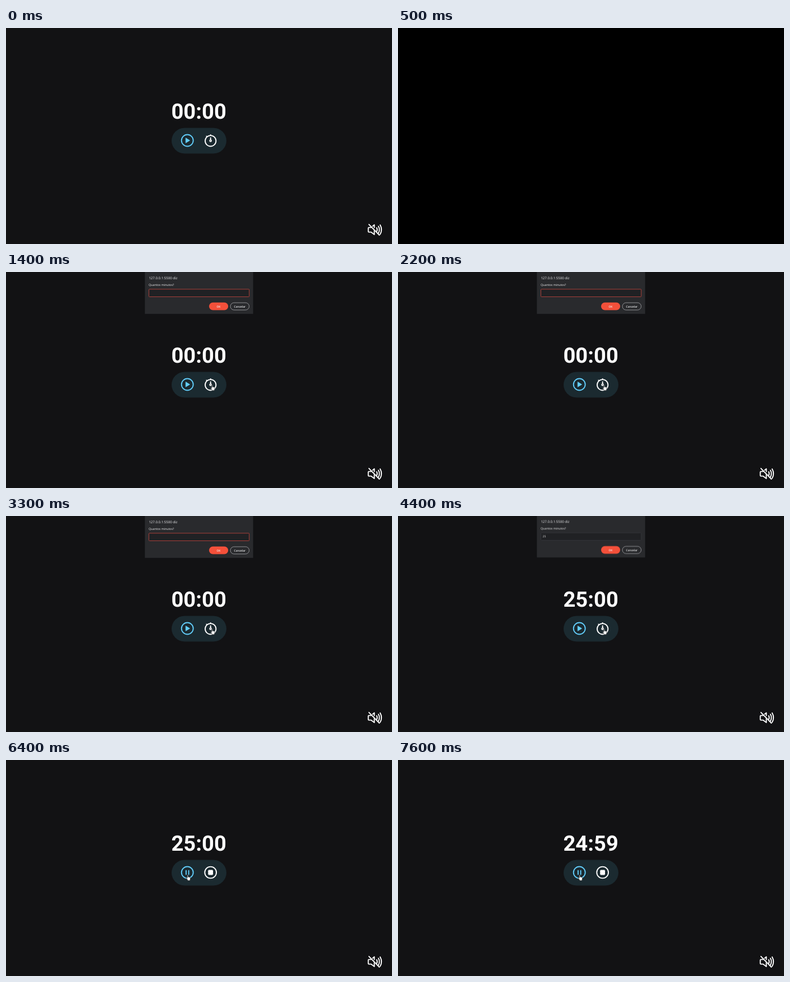
Write an HTML page that moves like this. It is 690 px wide and 388 px high and loops after 8000 ms.

```html
<!DOCTYPE html>
<html lang="pt">
<head>
<meta charset="utf-8">
<title>Focus timer</title>
<style>
  html, body { margin: 0; width: 100%; height: 100%; overflow: hidden; background: #121214; }
  svg { display: block; width: 690px; height: 388px; }
  text { text-rendering: geometricPrecision; fill: #f1f1f3; font-family: "Open Sans", "Noto Sans", sans-serif; }
  .clock text { font: 700 38.2px Roboto, Arial, sans-serif; fill: #fff; text-anchor: middle; }
  .line { fill: none; stroke: currentColor; stroke-width: 1.9; stroke-linecap: round; stroke-linejoin: round; }
  .blue { color: #62cdfa; }
  .white { color: #fff; }
  .btn { font-size: 4.9px; font-weight: 600; text-anchor: middle; }

  /* every part shares one 8 s clock with hard steps */
  .t { animation: 8s step-end infinite; }
  .zero { animation-name: zero; }
  .set { animation-name: set; }
  .run { animation-name: run; }
  .idle { animation-name: idle; }
  .active { animation-name: active; }
  .dialog { animation-name: dialog; }
  .field { animation-name: field; }
  .caret { animation-name: caret; }
  .key1 { animation-name: key1; }
  .key2 { animation-name: key2; }
  .hand { animation-name: hand; }
  .cut { animation-name: cut; }

  @keyframes zero { 0% { opacity: 1 } 55%, 100% { opacity: 0 } }
  @keyframes set { 0% { opacity: 0 } 55% { opacity: 1 } 92.5%, 100% { opacity: 0 } }
  @keyframes run { 0% { opacity: 0 } 92.5%, 100% { opacity: 1 } }
  @keyframes idle { 0% { opacity: 1 } 80%, 100% { opacity: 0 } }
  @keyframes active { 0% { opacity: 0 } 80%, 100% { opacity: 1 } }
  @keyframes cut { 0% { opacity: 0 } 6.25% { opacity: 1 } 8.75%, 100% { opacity: 0 } }
  @keyframes dialog {
    0% { opacity: 0; transform: translateY(-1.3px) }
    8.75% { opacity: 1; transform: translateY(-1.3px) }
    10% { opacity: 1; transform: none }
    55% { opacity: 1; transform: translateY(-.7px) }
    56.25% { opacity: .45; transform: translateY(-2px) }
    57.5%, 100% { opacity: 0; transform: translateY(-2px) }
  }
  @keyframes field { 0% { stroke: #a8403a } 55%, 100% { stroke: #35363a } }
  @keyframes caret {
    0%, 8.75% { opacity: 1; transform: none }
    13.75% { opacity: 0; transform: none }
    21.25% { opacity: 1; transform: none }
    27.5% { opacity: 0; transform: none }
    33.75% { opacity: 1; transform: none }
    41.25% { opacity: 0; transform: none }
    45% { opacity: 1; transform: translateX(3px) }
    48.75% { opacity: 1; transform: translateX(5.8px) }
    55%, 100% { opacity: 0; transform: none }
  }
  @keyframes key1 { 0% { fill: transparent } 45%, 100% { fill: #f1f1f3 } }
  @keyframes key2 { 0% { fill: transparent } 48.75%, 100% { fill: #f1f1f3 } }
  @keyframes hand {
    0% { opacity: 0; transform: translate(363px, 201.5px) }
    8.75% { opacity: 1; transform: translate(363px, 201.5px) }
    17.5% { opacity: 1; transform: translate(365.4px, 202.2px) }
    63.75% { opacity: 1; transform: translate(365px, 201.5px) }
    68.75% { opacity: 1; transform: translate(357.4px, 204.5px) }
    70% { opacity: 1; transform: translate(341px, 209.5px) }
    71.25% { opacity: 1; transform: translate(325.5px, 212px) }
    73.75% { opacity: 1; transform: translate(324px, 212.5px) }
    75% { opacity: 1; transform: translate(321.5px, 211px) }
    76.25% { opacity: 1; transform: translate(321px, 208.5px) }
    77.5%, 100% { opacity: 1; transform: translate(321.8px, 206px) }
  }
</style>
</head>
<body>
<svg viewBox="0 0 690 388">
  <rect width="690" height="388" fill="#121214"/>

  <g class="clock">
    <text class="t zero" x="344.6" y="163.4">00:00</text>
    <text class="t set" x="344.6" y="163.4">25:00</text>
    <text class="t run" x="344.6" y="163.4">24:59</text>
  </g>

  <rect x="296" y="179.5" width="98" height="46" rx="23" fill="#1b2a30"/>

  <g class="blue">
    <circle class="line" cx="324.2" cy="202" r="10.5"/>
    <path class="t idle" d="M321.4 197.7 L328.4 202 L321.4 206.3 Z" fill="currentColor" stroke="currentColor" stroke-linejoin="round"/>
    <path class="line t active" d="M321.9 198.6 V205.4 M326.6 198.6 V205.4"/>
  </g>

  <g class="white">
    <g class="line t idle">
      <circle cx="365.7" cy="202.8" r="9.7"/>
      <path d="M365.7 192 V193 M365.7 197.2 V200.6 M358.4 194.4 L359.3 195.2"/>
      <circle cx="365.7" cy="202.6" r="1.5" stroke-width="1.7"/>
    </g>
    <g class="t active">
      <circle class="line" cx="365.7" cy="202" r="10.4"/>
      <rect x="361.3" y="197.6" width="8.8" height="8.8" rx="1.6" fill="currentColor"/>
    </g>
    <g class="line">
      <path d="M652.4 358.4 H648.6 Q647.6 358.4 647.6 359.4 V365.6 Q647.6 366.6 648.6 366.6 H652.4 L658.4 371 V363.6 M655.4 355.9 L658.4 353.6 V358.6"/>
      <path d="M662.6 358.8 Q664.6 362.2 662.6 365.6 M665.8 356.2 Q669.2 362.2 665.8 368.2 M668.8 353.8 Q673.6 362.2 668.8 370.6"/>
      <path d="M648.8 352.8 L667.4 372"/>
    </g>
  </g>

  <g class="t dialog">
    <path d="M248.3 -2 H441.7 V75.2 H248.3 Z" fill="#292a2d"/>
    <text x="255.4" y="12.8" font-size="6.1">127.0.0.1:5500 diz</text>
    <text x="255.1" y="24.8" font-size="5.3">Quantos minutos?</text>
    <rect class="t field" x="255.4" y="30.9" width="179.4" height="13.6" rx="1" fill="#202124"/>
    <text x="258.6" y="39.4" font-size="5"><tspan class="t key1">2</tspan><tspan class="t key2">5</tspan></text>
    <rect class="t caret" x="258.5" y="33.8" width=".8" height="7" fill="#e0e0e2"/>
    <rect x="363" y="54.8" width="34.2" height="13.8" rx="6.9" fill="#f4503a"/>
    <text class="btn" x="380" y="63.5">OK</text>
    <rect x="401.1" y="55.2" width="33.6" height="13" rx="6.5" fill="none" stroke="#a9a9ad" stroke-width=".8"/>
    <text class="btn" x="417.9" y="63.5">Cancelar</text>
  </g>

  <g class="t hand">
    <path d="M2.2 1.1 Q2.2 .3 3 .3 Q3.8 .3 3.8 1.1 V4 L6.8 4.6 Q8 4.9 7.9 6 L7.4 8.6 Q7.1 9.4 7 10.7 H3.2 Q2.8 9 .6 6.8 Q.2 5.9 1 5.6 Q1.6 5.6 2.2 6.4 Z"
      fill="#fff" stroke="#15191c" stroke-width=".7" stroke-linejoin="round"/>
  </g>

  <rect class="t cut" width="690" height="388" fill="#000"/>
</svg>
</body>
</html>
```
